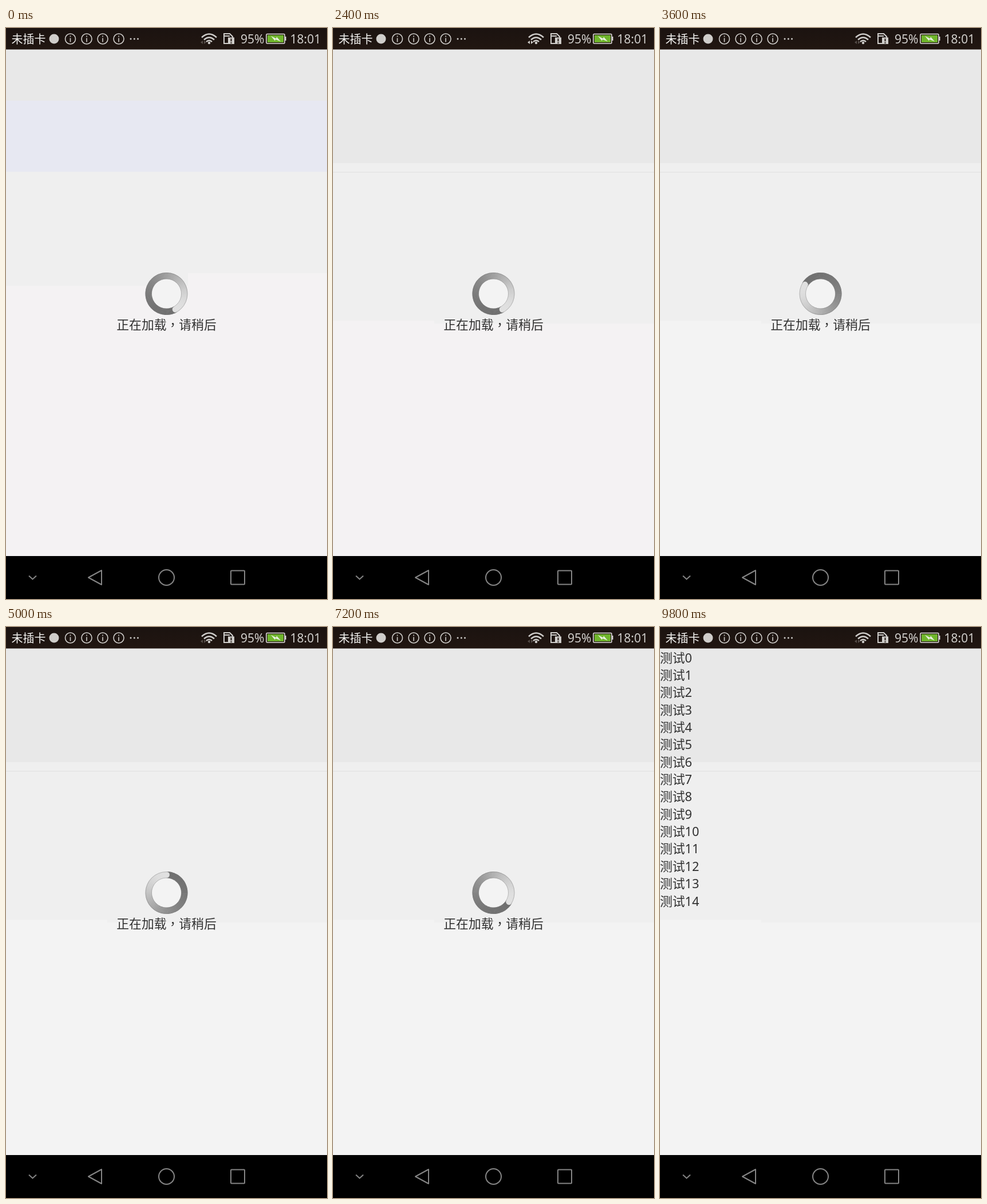
Recreate the animation shown at these times as an HTML page. Size 561 px wide and 997 px high, loop 10 s.

```html
<!DOCTYPE html>
<html lang="zh-CN">
<head>
<meta charset="utf-8">
<title>加载</title>
<style>
html, body { margin: 0; width: 100%; height: 100%; overflow: hidden; background: #f3f3f3; }
svg { display: block; width: 100%; height: 100%; }
text { font: 21.8px "Noto Sans", "Noto Sans CJK SC", "Noto Sans CJK", sans-serif; fill: #303030; }
.mid { text-anchor: middle; }
.comma { font-family: "Noto Sans CJK TC", sans-serif; }
.status text { font-size: 21px; fill: #cfcdca; }
.line { fill: none; stroke: #cfcdca; stroke-width: 1.6; }
.nav { fill: none; stroke: #858585; stroke-width: 2; }
</style>
</head>
<body>
<svg viewBox="0 0 561 997">
  <defs>
    <linearGradient id="bar" x1="0" y1="0" x2="0" y2="1">
      <stop offset="0" stop-color="#1b1310"/><stop offset="1" stop-color="#211611"/>
    </linearGradient>
    <linearGradient id="button" x1="0" y1="0" x2="0" y2="1">
      <stop offset="0" stop-color="#e9e1e5"/><stop offset=".45" stop-color="#e2dde0"/>
      <stop offset=".5" stop-color="#dedede"/><stop offset="1" stop-color="#cdcdcd"/>
    </linearGradient>
  </defs>

  <rect id="page" width="561" height="997" fill="#f3f3f3"/>
  <g id="firstBands">
    <path d="M0 251H561V428H318V450H0Z" fill="#efefef"/>
    <rect y="127" width="561" height="124" fill="#e7e8f2"/>
    <rect y="37" width="561" height="90" fill="#e8e8e8"/>
  </g>
  <g id="bands">
    <path d="M0 236H561V516H177V511H0Z" fill="#efefef"/>
    <rect y="37" width="561" height="199" fill="#e8e8e8"/>
    <rect y="251" width="561" height="1.5" fill="#e5e5e5"/>
  </g>

  <g id="loading">
    <circle cx="280.5" cy="464" r="26" fill="#f3f3f3"/>
    <g id="ring"></g>
    <g fill="none" stroke="#777" stroke-opacity=".4">
      <circle cx="280.5" cy="464" r="36.5"/><circle cx="280.5" cy="464" r="26"/>
    </g>
    <text class="mid" x="280.5" y="526">正在加载<tspan class="comma" lang="zh-TW">，</tspan>请稍后</text>
  </g>

  <g id="failed">
    <rect x="197" y="356" width="166" height="166" fill="#f3f3f3"/>
    <ellipse cx="277" cy="451" rx="70" ry="71" fill="#f8f8f8"/>
    <rect x="148.5" y="531" width="263.5" height="64.5" rx="2" fill="#999" opacity=".7"/>
    <rect x="149" y="530" width="262.5" height="64" rx="2" fill="url(#button)" stroke="#b4b2b3"/>
    <text class="mid" x="280" y="570" style="fill:#080808;font-weight:500">加载失败<tspan class="comma" lang="zh-TW">，</tspan>点击重新加载</text>
  </g>

  <g id="list"></g>

  <g class="status">
    <rect width="561" height="37.5" fill="url(#bar)"/>
    <text x="9.5" y="26.5" style="font-size:20px;font-weight:500;fill:#f4f4f2">未插卡</text>
    <circle cx="84" cy="19" r="8.5" fill="#cfcdca"/>
    <g id="notices"></g>
    <g fill="#cfcdca">
      <circle cx="218" cy="19" r="1.5"/><circle cx="224.3" cy="19" r="1.5"/><circle cx="230.5" cy="19" r="1.5"/>
    </g>
    <g class="line" style="stroke-width:2.4">
      <path d="M342 16.5Q355 4.5 368 16.5M346 20.5Q355 12.5 364 20.5M350 24Q355 19.5 360 24"/>
    </g>
    <circle cx="355" cy="26" r="2.2" fill="#cfcdca"/>
    <path id="traffic" d="M344 22V28L340 25ZM346 22V28L350 25Z" fill="#cfcdca"/>
    <path class="line" d="M388 27H381V10H391L396 15V17M381 14H391" style="stroke-width:2"/>
    <path d="M388 16.5H399V28H388Z" fill="#cfcdca"/>
    <path d="M393.5 18.5V23.5M393.5 25V27" stroke="#211611" stroke-width="2"/>
    <text x="410" y="27">95%</text>
    <rect x="455" y="10.5" width="32" height="16.5" rx="1.5" fill="#211611" stroke="#e2e0dd" stroke-width="1.6"/>
    <rect x="457" y="12.5" width="28" height="12.5" fill="#70b62c"/>
    <rect x="487.5" y="15" width="2" height="7" fill="#e2e0dd"/>
    <path d="M463 14L472 18.5L473 15.5L480 23.5L471 20L470 22.5Z" fill="#e8efdf"/>
    <text x="496.5" y="27">18:01</text>
  </g>

  <rect y="922" width="561" height="75" fill="#000"/>
  <g class="nav">
    <path d="M40 956.5L46.5 962.5L53 956.5"/>
    <path d="M144 959.5L167 947V972Z" stroke-linejoin="round"/>
    <circle cx="280.5" cy="959.5" r="13.5"/>
    <rect x="393" y="947.5" width="24" height="24" rx="1"/>
  </g>
</svg>
<script>
const $ = id => document.getElementById(id);
const show = (id, on) => $(id).style.display = on ? "" : "none";

$("notices").innerHTML = [112.5, 141, 169, 197].map(x =>
  `<circle class="line" cx="${x}" cy="19" r="9"/>
   <path class="line" d="M${x} 17.5V24.5M${x} 13.5V15.5"/>`).join("");

$("list").innerHTML = Array.from({ length: 15 }, (_, i) =>
  `<text x="0" y="${61.5 + i * 30.36}">测试${i}</text>`).join("");

// The ring is drawn with its bright head at angle 0, fading anticlockwise.
const SEGMENTS = 90, RADIUS = 31.4;
const point = a => `${RADIUS * Math.cos(a)} ${RADIUS * Math.sin(a)}`;
const shade = back => {
  const v = Math.round(110 + 114 * Math.exp(-((back / 0.45) ** 2)));
  return `rgb(${v},${v},${v})`;
};
let ring = "";
for (let i = SEGMENTS - 1; i >= 0; i--) {
  const from = -(i + 1) / SEGMENTS * 2 * Math.PI;
  const to = from + 2 * Math.PI / SEGMENTS + (i ? 0.015 : 0);
  ring += `<path d="M${point(from)}A${RADIUS} ${RADIUS} 0 0 1 ${point(to)}"
    fill="none" stroke="${shade(i / SEGMENTS)}" stroke-width="11.2"/>`;
}
$("ring").innerHTML = ring + `<circle cx="${RADIUS}" r="5.5" fill="${shade(0)}"/>`;

const LOOP = 10000, FRAME = 200;
// The spinner turns in 30 degree ticks; each attempt has its own phase.
const attempts = [
  { start: 0, end: 2600, at: 0, angle: 60, tick: 100 },
  { start: 3000, end: 6000, at: 3600, angle: 210, tick: 102 },
  { start: 6800, end: 9800, at: 7200, angle: 30, tick: 105 },
];

function draw(now) {
  const t = Math.floor(now % LOOP / FRAME) * FRAME;
  const run = attempts.find(a => t >= a.start && t < a.end);
  const done = t >= 9800;

  show("loading", run);
  show("failed", !run && !done);
  show("list", done);
  show("firstBands", t < 400);
  show("bands", t >= 400);
  $("page").setAttribute("fill", t < 2600 ? "#f4f2f3" : "#f3f3f3");

  const phase = t % 3400;
  $("traffic").setAttribute("opacity", phase >= 2000 && phase < 2800 ? 1 : 0.3);

  if (run) {
    const angle = run.angle + 30 * Math.round((t - run.at) / run.tick);
    $("ring").setAttribute("transform", `translate(280.5 464) rotate(${angle})`);
  }
}

const begin = performance.now();
function loop() {
  draw(performance.now() - begin);
  requestAnimationFrame(loop);
}
loop();
</script>
</body>
</html>
```
